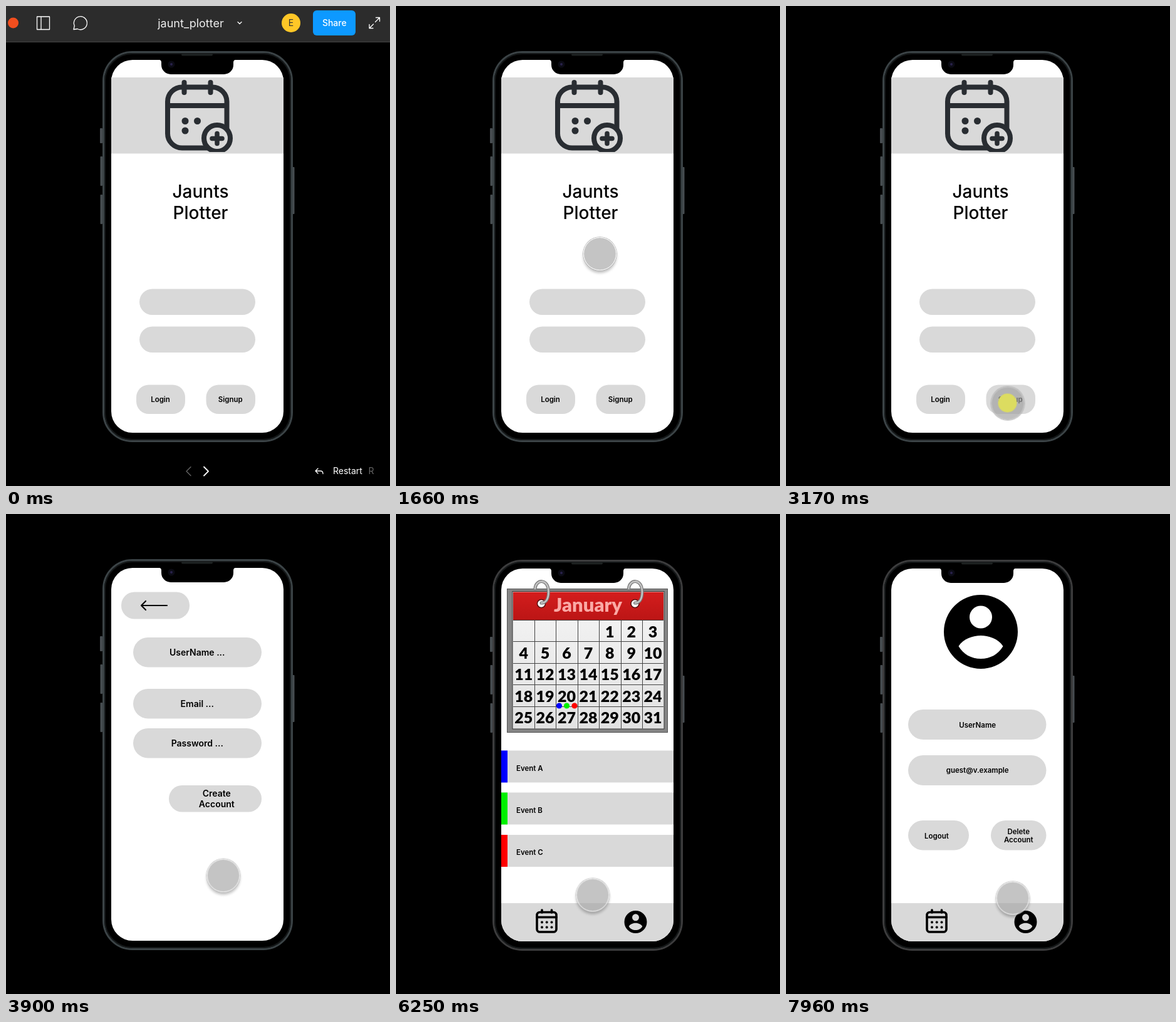
An HTML page that plays this animation: 613x766 px, repeating every 8000 ms.

```html
<!DOCTYPE html>
<html lang="en">
<head>
<meta charset="utf-8">
<title>Prototype walkthrough</title>
<style>
html, body { margin: 0; width: 100%; height: 100%; overflow: hidden; background: #000; }
#stage { position: relative; width: 613px; height: 766px; overflow: hidden; background: #000; }
svg { display: block; font-family: Inter, Roboto, sans-serif; }
.mid { text-anchor: middle; }
.b { font-size: 11.5px; font-weight: 600; }
.b14 { font-size: 14px; font-weight: 600; }
.grey { fill: #d9d9d9; }
.line { fill: none; stroke-linecap: round; stroke-linejoin: round; }
.days { font: 900 25px Lato, "Open Sans", sans-serif; }

/* Screen switches */
#phone, #home, #signup, #month, #profile, #nav, .dim, #cursor, #tap { animation: 8s step-end infinite; }
#phone { animation-name: phone; }
#home { animation-name: home; }
#signup { animation-name: signup; }
#month { animation-name: month; }
#profile { animation-name: profile; }
#nav { animation-name: nav; }
.dim { animation-name: dim; }
#chrome { animation: chrome 8s linear infinite; }
@keyframes phone { 0% { color: #3b4346; transform: none; } 67.25%, 100% { color: #3c3c3d; transform: translateY(1px); } }
@keyframes home { 0% { opacity: 1; } 42.125%, 100% { opacity: 0; } }
@keyframes signup { 0% { opacity: 0; } 42.125% { opacity: 1; } 67.25%, 100% { opacity: 0; } }
@keyframes month { 0% { opacity: 0; } 67.25% { opacity: 1; } 95.375%, 100% { opacity: 0; } }
@keyframes profile { 0% { opacity: 0; } 95.375%, 100% { opacity: 1; } }
@keyframes nav { 0% { opacity: 0; } 67.25%, 100% { opacity: 1; } }
@keyframes dim { 0% { filter: none; } 82.5%, 100% { filter: brightness(.75); } }
@keyframes chrome { 0%, 16.5% { opacity: 1; } 19%, 100% { opacity: 0; } }

/* Touch cursor: the wrapper moves, the disc reacts to presses */
#path { position: absolute; left: 0; top: 0; animation: path 8s infinite; }
#cursor {
  position: absolute; left: -26.5px; top: -26.5px; width: 53px; height: 53px;
  box-sizing: border-box; border: 1px solid #fff; border-radius: 50%;
  background: rgba(166, 166, 166, .66); animation-name: press;
  box-shadow: 0 0 0 .7px #aaa, 0 4px 4px rgba(0, 0, 0, .25);
}
#tap {
  position: absolute; left: 10.5px; top: 10.5px; width: 30px; height: 30px;
  border-radius: 50%; background: #dcdc60; animation-name: tap;
}
@keyframes press {
  0%, 18.25%, 43%, 68.125%, 96.25%, 100% {
    background: rgba(166, 166, 166, .66); border-color: #fff;
    box-shadow: 0 0 0 .7px #aaa, 0 4px 4px rgba(0, 0, 0, .25);
  }
  15.75%, 39.625%, 64.75%, 92.875% {
    background: rgba(160, 160, 160, .67); border-color: #c8c8c8;
    box-shadow: 0 0 0 1px #b4b4b4;
  }
}
@keyframes tap {
  0%, 18.25%, 43%, 68.125%, 96.25%, 100% { opacity: 0; }
  15.75%, 39.625%, 64.75%, 92.875% { opacity: 1; }
}
@keyframes path {
  0% { transform: translate(524px, 830px); animation-timing-function: steps(1); }
  3.75% { transform: translate(524px, 745px); animation-timing-function: steps(5); }
  8.125% { transform: translate(425px, 500px); animation-timing-function: steps(5); }
  12.375%, 18.25% { transform: translate(391.5px, 380.5px); animation-timing-function: steps(2); }
  20% { transform: translate(325px, 395px); animation-timing-function: steps(2); }
  21.75% { transform: translate(265px, 435px); animation-timing-function: steps(2); }
  23.5% { transform: translate(268px, 560px); animation-timing-function: steps(2); }
  25.125% { transform: translate(235.5px, 631.5px); animation-timing-function: steps(1); }
  26% { transform: translate(262px, 665px); animation-timing-function: steps(1); }
  26.875% { transform: translate(312px, 674.5px); animation-timing-function: steps(1); }
  27.625% { transform: translate(349.5px, 645.5px); animation-timing-function: steps(2); }
  29.375% { transform: translate(370.5px, 632px); animation-timing-function: steps(2); }
  31.125%, 47.875% { transform: translate(353.5px, 633.5px); animation-timing-function: steps(1); }
  48.75% { transform: translate(346.5px, 576.5px); animation-timing-function: steps(6); }
  54%, 74.625% { transform: translate(335.5px, 467.5px); animation-timing-function: steps(4); }
  78.125% { transform: translate(313.5px, 607.5px); animation-timing-function: steps(2); }
  79.875% { transform: translate(252.5px, 648px); animation-timing-function: steps(3); }
  82.5% { transform: translate(268px, 292px); animation-timing-function: steps(3); }
  85.125% { transform: translate(417.5px, 374.5px); animation-timing-function: steps(1); }
  86% { transform: translate(448.5px, 500px); animation-timing-function: steps(1); }
  86.875% { transform: translate(416.5px, 622.5px); animation-timing-function: steps(4); }
  90.375%, 98.625% { transform: translate(375.5px, 661.5px); animation-timing-function: steps(1); }
  99.5%, 100% { transform: translate(361.5px, 612.5px); }
}
</style>
</head>
<body>
<div id="stage">
<svg width="613" height="766" viewBox="0 0 613 766">
  <defs>
    <linearGradient id="red" x2="0" y2="1"><stop stop-color="#d41d1d"/><stop offset="1" stop-color="#bb1515"/></linearGradient>
    <linearGradient id="paper" x2="0" y2="1"><stop stop-color="#f5f5f5"/><stop offset="1" stop-color="#e2e2e2"/></linearGradient>
    <clipPath id="crop"><rect x="168" y="114" width="275" height="119"/></clipPath>
    <path id="person" fill-rule="evenodd" d="M-59 0A59 59 0 1 1 59 0A59 59 0 1 1 -59 0ZM-18 -23.5A18 18 0 1 0 18 -23.5A18 18 0 1 0 -18 -23.5ZM-35.500 23C-28 11 -12 6 0 6S28 11 35.500 23C28 36 15 43 0 43S-28 36 -35.500 23Z"/>
    <g id="ring">
      <circle cx="0" cy="143" r="6.500" fill="#fff" stroke="#5a1010" stroke-width="1.500"/>
      <g class="line">
        <path id="coil" d="M-10 119C-9 104 11 102 11.500 124C11.500 136 7 142 0 142" stroke="#777" stroke-width="5"/>
        <path d="M-10 119C-9 104 11 102 11.500 124C11.500 136 7 142 0 142" stroke="#c4c4c4" stroke-width="2.600"/>
      </g>
    </g>
  </defs>

  <g id="phone">
    <g fill="#474d51">
      <rect x="150" y="195" width="4" height="24" rx="1"/>
      <rect x="150.500" y="240" width="3.500" height="47" rx="1"/>
      <rect x="150.500" y="301" width="3.500" height="47" rx="1"/>
      <rect x="457" y="257" width="3.500" height="75" rx="1"/>
    </g>
    <rect x="155.500" y="73.500" width="301" height="621" rx="46" fill="#000" stroke="currentColor" stroke-width="3"/>
    <rect x="158" y="76" width="296" height="616" rx="43.500" fill="none" stroke="#151819" stroke-width="2"/>
    <rect x="280" y="76" width="50" height="3.500" rx="1.700" fill="#1d2121"/>
    <rect x="168" y="86" width="275" height="595" rx="34" fill="#fff"/>
    <path d="M244 85.500q4 .5 4 4.500v4a15 15 0 0 0 15 15h85a15 15 0 0 0 15 -15v-4q0 -4 4 -4.500z"/>
    <circle cx="264" cy="93" r="5.500" fill="#0b0b14"/>
    <circle cx="264" cy="93" r="2" fill="#29224a"/>
  </g>

  <g id="home">
    <rect class="grey" x="168" y="114" width="275" height="121.500"/>
    <g clip-path="url(#crop)" class="line" stroke="#292d32" stroke-width="8">
      <rect x="258" y="129.500" width="94.500" height="97" rx="23"/>
      <path d="M258 159H352M284.500 122V138M326.500 122V138"/>
      <path d="M286 183.500h.01M305.500 183.500h.01M286 199h.01" stroke-width="11"/>
      <circle class="grey" cx="337" cy="211" r="21"/>
      <path d="M329 211.500H345M337 203.500V219.500" stroke-width="7.500"/>
    </g>
    <g class="mid" font-size="28" font-weight="500">
      <text x="310.500" y="306">Jaunts</text>
      <text x="310.500" y="340">Plotter</text>
    </g>
    <g class="grey">
      <rect x="213" y="451.500" width="185" height="41.500" rx="20.700"/>
      <rect x="213" y="511.500" width="185" height="41.500" rx="20.700"/>
      <rect x="208" y="604.500" width="78" height="46.500" rx="20"/>
      <rect x="319.500" y="604.500" width="78.500" height="46.500" rx="20"/>
    </g>
    <g class="mid b">
      <text x="246.500" y="632">Login</text>
      <text x="358.300" y="632">Signup</text>
    </g>
  </g>

  <g id="signup">
    <g class="grey">
      <rect x="184" y="124.500" width="109" height="43" rx="21"/>
      <rect x="203" y="197" width="205" height="47.500" rx="23.700"/>
      <rect x="203" y="279" width="205" height="47.500" rx="23.700"/>
      <rect x="203" y="342" width="205" height="47.500" rx="23.700"/>
      <rect x="260" y="433" width="148" height="42.500" rx="21"/>
    </g>
    <path class="line" d="M257 146H216M223 139L216 146L223 153" stroke="#000" stroke-width="2.200"/>
    <g class="mid b14">
      <text x="305.300" y="225.500">UserName ...</text>
      <text x="305.300" y="307.500">Email ...</text>
      <text x="305.300" y="370.500">Password ...</text>
      <text x="336.300" y="451">Create</text>
      <text x="336.300" y="468">Account</text>
    </g>
  </g>

  <g id="month">
    <rect x="177.500" y="119.500" width="256" height="229" fill="#858585" stroke="#555"/>
    <rect x="186" y="123.500" width="242" height="219.500" fill="url(#paper)" stroke="#333"/>
    <rect x="187" y="124.500" width="240" height="45" fill="url(#red)"/>
    <path id="grid" stroke="#444" fill="none"/>
    <text class="mid days" x="306.500" y="156" fill="#faa9a5" style="font-size:31px">January</text>
    <g id="days" class="mid days"></g>
    <use href="#ring" x="232"/>
    <use href="#ring" x="381.500"/>
    <g class="dim">
      <circle cx="260.500" cy="306" r="4.600" fill="#00f"/>
      <circle cx="272.500" cy="306" r="4.600" fill="#00f000"/>
    </g>
    <circle cx="285" cy="306" r="4.600" fill="#f00"/>
    <path class="grey" d="M168 377.500h275v51h-275zM168 444.500h275v51h-275zM168 512h275v51h-275z"/>
    <rect x="168" y="377.500" width="10" height="51" fill="#00f"/>
    <rect x="168" y="444.500" width="10" height="51" fill="#00f000"/>
    <rect x="168" y="512" width="10" height="51" fill="#f00"/>
    <g class="b">
      <text x="192" y="409.500">Event A</text>
      <text x="192" y="476.500">Event B</text>
      <text x="192" y="543.500">Event C</text>
    </g>
  </g>

  <g id="profile">
    <use href="#person" x="311" y="188"/>
    <g class="grey">
      <rect x="195" y="312" width="220.500" height="48" rx="24"/>
      <rect x="195" y="385" width="220.500" height="48" rx="24"/>
      <rect x="195" y="489" width="97" height="47.500" rx="23.700"/>
      <rect x="327" y="489" width="88.500" height="47.500" rx="23.700"/>
    </g>
    <g class="mid b">
      <text x="305.700" y="340.500">UserName</text>
      <text x="305.700" y="413">guest@v.example</text>
      <text x="240.500" y="517.500">Logout</text>
      <text x="371.300" y="510.500">Delete</text>
      <text x="371.300" y="524">Account</text>
    </g>
  </g>

  <g id="nav">
    <path class="grey" d="M168 621H443V648A34 34 0 0 1 409 682H202A34 34 0 0 1 168 648Z"/>
    <g class="line" stroke="#000" stroke-width="3.600">
      <rect x="225" y="635.500" width="31" height="31.500" rx="4.500"/>
      <path d="M225 643.500H256M233 632V636M248.500 632V636"/>
      <path d="M233 651.500h.01M240.700 651.500h.01M248.500 651.500h.01M233 659.500h.01M240.700 659.500h.01M248.500 659.500h.01" stroke-width="4"/>
    </g>
    <use href="#person" transform="translate(382.500 651) scale(.305)"/>
  </g>

  <g id="chrome">
    <rect width="613" height="58" fill="#2c2c2c"/>
    <rect y="57" width="613" height="1" fill="#444"/>
    <circle cx="11.500" cy="27" r="8.500" fill="#f24e1e"/>
    <g class="line" stroke="#fff" stroke-width="1.300">
      <path d="M49.500 17H69.500V37.500H49.500ZM56 17V37.500"/>
      <path d="M108 37.500L109.300 31.500A10.500 10.500 0 1 1 114 36.500Z"/>
      <path d="M370 25.500L373 28.500L376 25.500"/>
      <path d="M589.500 25.500L596 19M590.500 18.500H596.500V24.500M586.500 29L580.500 35M580 29.500V35.500H586"/>
      <path d="M498 738L494 742L498 746M494 742H502Q506 742 506 746.500"/>
      <path d="M316 735.500L323 742.500L316 749.500" stroke-width="1.800"/>
      <path d="M295 735.500L288 742.500L295 749.500" stroke="#666"/>
    </g>
    <text class="mid" x="295" y="34" font-size="18" fill="#eee">jaunt_plotter</text>
    <circle cx="455" cy="27" r="15" fill="#ffc727"/>
    <text class="mid" x="455" y="32" font-size="14" fill="#333">E</text>
    <rect x="490" y="7" width="68" height="40" rx="6" fill="#0d99ff"/>
    <text class="mid" x="524.300" y="31.500" font-size="14" font-weight="500" fill="#fff">Share</text>
    <text x="522" y="747" font-size="14" fill="#fff">Restart</text>
    <text x="578.500" y="747" font-size="14" fill="#666">R</text>
  </g>
</svg>
<div id="path"><div id="cursor"><div id="tap"></div></div></div>
</div>
<script>
// Month grid: seven columns, five rows, the 1st in the fifth column
const cell = 34.4, left = 186.5, top0 = 170;
let lines = "", days = "";
for (let c = 1; c < 7; c++) lines += `M${Math.round(left + c * cell) + .5} ${top0}V342.5`;
for (let r = 0; r < 5; r++) lines += `M187 ${Math.round(top0 + r * cell) - .5}H427`;
for (let d = 1; d <= 31; d++) {
  const i = d + 3, x = left + (i % 7 + .5) * cell, y = 196.5 + Math.floor(i / 7) * cell;
  days += `<text x="${x.toFixed(1)}" y="${y.toFixed(1)}">${d}</text>`;
}
document.getElementById("grid").setAttribute("d", lines);
document.getElementById("days").innerHTML = days;
</script>
</body>
</html>
```
